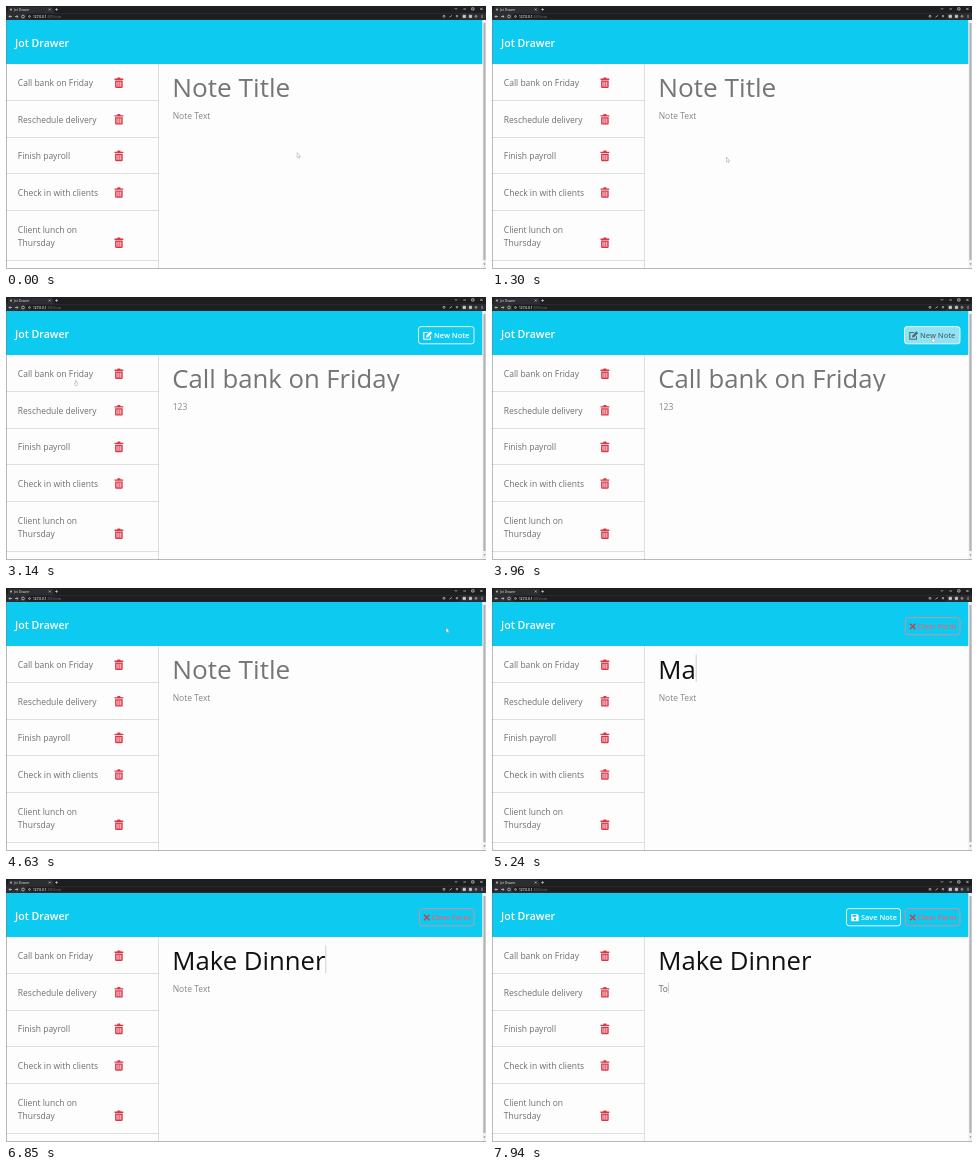
An HTML page for the animation above (8 s loop, 480x263 px).

```html
<!DOCTYPE html>
<html lang="en">
<head>
<meta charset="utf-8">
<title>Jot Drawer</title>
<style>
html, body { margin: 0; height: 100%; overflow: hidden; background: #fdfdfd }
svg { display: block; width: 100vw; height: 100vh }
text { font-family: "Open Sans", "Noto Sans", sans-serif; font-size: 8.5px; white-space: pre }
.list text { fill: #6b6f73 }
.small { font-size: 3.2px; fill: #e4e4e4 }
.button text { font-size: 7.4px; font-weight: 600 }
.button rect { rx: 2.5px }
.line { fill: none; stroke: currentColor; stroke-width: .9 }
</style>
</head>
<body>
<svg viewBox="0 0 480 263" preserveAspectRatio="none">
  <defs>
    <g id="trash">
      <path fill="#dc3545" d="M0 1.2H2.6L3.2 0H5.6L6.2 1.2H8.8V2.5H0ZM.6 3.2H8.2V9.4Q8.2 10.6 7 10.6H1.8Q.6 10.6 .6 9.4Z"/>
      <path stroke="#fdfdfd" stroke-width=".85" d="M2.5 4.4V9.3M4.4 4.4V9.3M6.3 4.4V9.3"/>
    </g>
    <clipPath id="field"><rect x="160" y="62" width="310" height="32.3"/></clipPath>
  </defs>

  <!-- browser bar -->
  <rect width="480" height="14" fill="#1d1e20"/>
  <rect y="7" width="480" height="7" fill="#2c2d30"/>
  <path fill="#2c2d30" d="M1 7.2L2.5 1.5Q2.7 .8 3.5 .8H46Q46.8 .8 47 1.5L48.5 7.2Z"/>
  <rect x="20" y="7.8" width="435" height="5.4" rx="2.7" fill="#1d1e20"/>
  <circle cx="5" cy="3.6" r="1.1" fill="#aaa"/>
  <text class="small" x="8" y="4.8">Jot Drawer</text>
  <text class="small" x="27" y="11.6" style="font-weight:600">127.0.0.1</text>
  <text class="small" x="41" y="11.6" style="fill:#777;font-size:2.6px">:3001/notes</text>
  <g class="line" color="#d0d0d0" style="stroke-width:.7">
    <path d="M42.8 2.6L44.6 4.4M44.6 2.6L42.8 4.4M49.2 3.5H52M50.6 2.1V4.9"/>
    <path d="M6 10.5H3M4.3 9.2L3 10.5L4.3 11.8M9 10.5H12M10.7 9.2L12 10.5L10.7 11.8"/>
    <circle cx="17" cy="10.5" r="1.4"/><circle cx="23.5" cy="10.5" r=".9"/>
    <path d="M448.8 2.2L450 3.4L451.2 2.2M457.4 3H460M465.7 1.8H468V4H465.7ZM474.3 1.8L476.5 4M476.5 1.8L474.3 4"/>
    <circle cx="438" cy="10.3" r="1"/><path d="M443.5 11.2L446 9.4M449.8 10H452.2M451 9V11.5"/>
    <path d="M457 9.2H459.5V11.6H457ZM463.3 9.2H465.6V11.6H463.3Z" fill="#d0d0d0"/>
    <circle cx="470" cy="10.4" r=".9"/><path d="M476 8.8V12"/>
  </g>

  <!-- page -->
  <rect y="14" width="476.5" height="44" fill="#0dcaf0"/>
  <text x="9" y="41" fill="#fff" style="font-size:10.6px;font-weight:600">Jot Drawer</text>
  <path stroke="#dedede" d="M152.5 58V263"/>
  <g class="list" id="list"></g>
  <rect x="476.5" y="14" width="3.5" height="249" fill="#efefef"/>
  <rect x="477.4" y="17" width="2.2" height="237" fill="#b3b3b3"/>
  <path d="M477.4 257.5H479.6L478.5 259Z" fill="#777"/>
  <path d="M.4 14V262.6H480" fill="none" stroke="#777" stroke-width=".8" opacity=".7"/>

  <g clip-path="url(#field)"><text id="title" x="166.3" y="91"></text></g>
  <text id="body" x="166.7" y="112.7"></text>
  <rect id="caret" width=".7" fill="#bbb"/>

  <g class="button" id="newNote" color="#fff">
    <rect id="newFill" x="412.5" y="29.6" width="55.5" height="17.2" fill="#f8f9fa"/>
    <rect class="line" x="412.5" y="29.6" width="55.5" height="17.2" style="stroke:#f8f9fa"/>
    <g id="newInk">
      <path class="line" style="stroke-width:1.1" d="M422 35.5H417.8V42.3H424.4V39.3"/>
      <path fill="currentColor" d="M420 40.6L420.3 38.5L424.4 34.2L426.2 36L422.1 40.3Z"/>
      <text x="428" y="41.3" fill="currentColor">New Note</text>
    </g>
  </g>
  <g class="button" id="save" color="#fff">
    <rect class="line" x="354.5" y="29.6" width="54" height="17.2"/>
    <path fill="currentColor" fill-rule="evenodd" d="M359.3 34.9H365L366.7 36.6V42.3H359.3ZM360.5 35.9V37.7H364.4V35.9ZM363 38.8A1.1 1.1 0 1 0 363.01 38.8Z"/>
    <text x="369" y="41.3" fill="currentColor">Save Note</text>
  </g>
  <g class="button" id="clear" color="#dd8f9a">
    <rect class="line" x="413.6" y="29.6" width="54.4" height="17.2"/>
    <path d="M418 35.7L423.4 41.3M423.4 35.7L418 41.3" stroke="#d8394a" stroke-width="1.4"/>
    <text x="425.6" y="41.3" fill="#f0606c">Clear Form</text>
  </g>

  <g id="cursor">
    <circle id="click" r="3" cy="1.5" fill="#d8dc3c"/>
    <path id="arrow" d="M-.8 -2.4V2.6L.3 1.7L1 3.2L1.7 2.8L1.1 1.4H2.4Z" fill="#fff" stroke="#888" stroke-width=".4"/>
    <path id="hand" d="M-.6 1V-1.9Q-.2 -2.6 .3 -1.9V-.2L1.9 .3V2L1.2 3.2H-.5L-1.7 1.1Z" fill="#fff" stroke="#888" stroke-width=".4"/>
  </g>
</svg>
<script>
const $ = id => document.getElementById(id);
const show = (id, alpha) => $(id).setAttribute("opacity", +alpha);

const rows = ["Call bank on Friday", "Reschedule delivery", "Finish payroll", "Check in with clients", "Client lunch on"];
$("list").innerHTML = rows.map((row, i) => {
  const y = 80.2 + i * 36.6, last = i == 4 ? 13.6 : 0;
  return `<text x="11.8" y="${y}">${row}</text>
    <use href="#trash" x="108.5" y="${y - 8.8 + last}"/>
    <path d="M0 ${Math.floor(y + 14.3 + last) + .5}H152" stroke="#dedede"/>`;
}).join("") + '<text x="11.8" y="240.2">Thursday</text>';

// Cursor paths: start, end, then points evenly spaced in time
const moves = [
  [1090, 1860, [[292, 149], [276, 163], [212, 148], [130, 108], [78, 72], [64, 69], [64, 78]]],
  [3140, 3890, [[70, 85.5], [92, 108], [150, 127], [250, 122], [350, 88], [425, 52], [456, 37], [441, 42]]],
  [4840, 4910, [[440, 41], [438, 43.5]]]
];
const titleKeys = [5110, 5240, 5450, 5580, 5710, 5990, 6120, 6250, 6460, 6720, 6850];
const bodyKeys = [7660, 7940];
const typed = (word, keys, t) => word.slice(0, keys.filter(k => k <= t).length);

function cursorAt(t) {
  const [start, end, points] = moves.findLast(m => m[0] <= t) || moves[0];
  const step = Math.floor((t - start) / 70) * 70;
  const u = Math.max(0, Math.min(1, step / (end - start))) * (points.length - 1);
  const i = Math.min(Math.floor(u), points.length - 2);
  return points[i].map((v, k) => v + (points[i + 1][k] - v) * (u - i));
}

function setText(id, value, color, size) {
  const el = $(id);
  el.textContent = value;
  el.style.fill = color;
  el.style.fontSize = size + "px";
}

function draw(t) {
  const open = t >= 2270 && t < 4630;
  const title = typed("Make Dinner", titleKeys, t);
  const body = typed("To", bodyKeys, t);
  if (open) setText("title", rows[0], "#757575", 25.7);
  else setText("title", title || "Note Title", title ? "#111" : "#757575", title ? 25.7 : 26.2);
  setText("body", open ? "123" : body || "Note Text", body ? "#666" : "#858585", 8.5);

  const inBody = t >= 7190, field = $(inBody ? "body" : "title");
  const width = (inBody ? body : title) ? field.getComputedTextLength() : 0;
  const caret = $("caret");
  caret.setAttribute("x", +field.getAttribute("x") + width);
  caret.setAttribute("y", inBody ? 103.5 : 66.5);
  caret.setAttribute("height", inBody ? 11 : 27.5);
  show("caret", t >= 5110);

  show("newNote", open);
  show("newFill", t < 3960 ? 0 : t < 4040 ? .55 : 1);
  $("newInk").style.color = t < 3960 ? "#fff" : t < 4040 ? "#56686e" : "#212529";
  show("clear", t < 5110 ? 0 : t < 5240 ? .6 : 1);
  show("save", t < 7660 ? 0 : t < 7730 ? .6 : 1);

  const [x, y] = cursorAt(t);
  const hand = x < 152 || (t >= 3960 && t < 4630);
  $("cursor").setAttribute("transform", `translate(${x} ${y})`);
  show("cursor", t < 5110);
  show("click", (t >= 2200 && t < 2270) || (t >= 4560 && t < 4630) ? .7 : 0);
  show("hand", hand);
  show("arrow", !hand);
}

function tick() {
  draw(performance.now() % 8000);
  requestAnimationFrame(tick);
}
tick();
</script>
</body>
</html>
```
